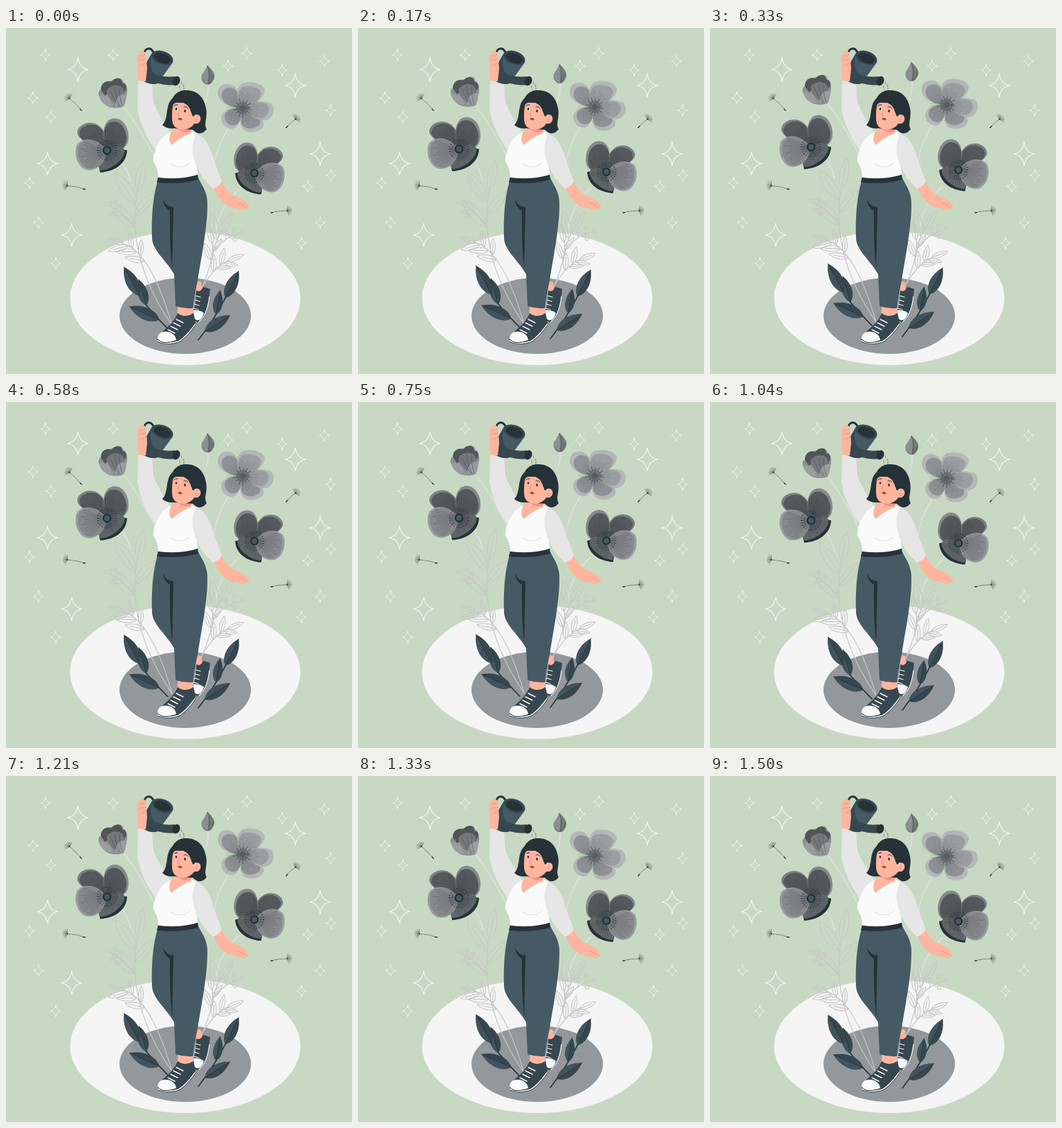
An HTML page for the animation above (1.54 s loop, 500 by 500 pixels).

```html
<!DOCTYPE html>
<html lang="en">
<head>
<meta charset="utf-8">
<title>Watering the flowers</title>
<style>
html, body { margin: 0; width: 100%; height: 100%; overflow: hidden; background: #c7d9c2; }
svg { display: block; width: 100vw; height: 100vh; }
.line { fill: none; stroke-linecap: round; stroke-linejoin: round; }
</style>
</head>
<body>
<svg id="stage" viewBox="0 0 500 500"></svg>
<script>
(() => {
const INK = '#263238', SLATE = '#37474f', DENIM = '#455a64', SKIN = '#ffb59e', BLUSH = '#e88f7c';
const PALE = '#c7c7c7', STEM = '#dedfdd', WHITE = '#fafafa', SLEEVE = '#e6e6e6';
const LOOP = 1540, LIFT = 9.6, LEAD = 60;

const fill = (color, d) => `<path fill="${color}" d="${d}"/>`;
const line = (color, width, d) => `<path class="line" stroke="${color}" stroke-width="${width}" d="${d}"/>`;
const oval = (color, x, y, rx, ry = rx, turn = 0) =>
  `<ellipse fill="${color}" cx="${x}" cy="${y}" rx="${rx}" ry="${ry}" transform="rotate(${turn} ${x} ${y})"/>`;
const place = (x, y, sx, sy, body) => `<g transform="translate(${x} ${y}) scale(${sx} ${sy})">${body}</g>`;
const repeat = (count, make) => Array.from({ length: count }, (_, i) => make(i)).join('');

const star = size => ([x, y]) => {
  const k = size * .13, w = size * .88;
  const d = `M0 ${-size}Q${k} ${-k} ${w} 0Q${k} ${k} 0 ${size}Q${-k} ${k} ${-w} 0Q${-k} ${-k} 0 ${-size}Z`;
  return place(x, y, 1, 1, line('#f7faf5', size > 12 ? 1.1 : .75, d));
};

// A thin stalk from the seed to a fan of hairs
function dandelion(x, y, seedX, seedY) {
  const back = Math.atan2(y - seedY, x - seedX), cos = Math.cos(back), sin = Math.sin(back);
  const hairs = repeat(7, i => {
    const a = back + (i - 3) * .42;
    return `M${x} ${y}l${7 * Math.cos(a)} ${7 * Math.sin(a)}`;
  });
  return line(INK, .5, `${hairs}M${x} ${y}Q${(x + seedX) / 2} ${(y + seedY) / 2 - 2} ${seedX} ${seedY}`) +
    line(INK, 1.5, `M${seedX} ${seedY}l${2.4 * cos} ${2.4 * sin}`);
}

// Leaves and berries point along +x from their base
const blade = (n, w) => `M0 0C${n * .2} ${-w} ${n * .65} ${-w} ${n} 0C${n * .65} ${w} ${n * .2} ${w} 0 0Z`;
const paleLeaf = n => line(PALE, 1.1, `${blade(n, n * .2)}M0 0H${n * .75}`);
const darkLeaf = n => fill(SLATE, blade(n, n * .25)) +
  fill('#41535d', `M0 0C${n * .2} ${-n * .25} ${n * .65} ${-n * .25} ${n} 0Z`) + line(INK, .8, `M0 0H${n}`);
const berry = n => line(PALE, 1.1, `M0 0H${n}m5 0a2.5 2.5 0 1 1 -5 0a2.5 2.5 0 1 1 5 0`);

// A curved stem with growths on alternate sides and one at its tip
function sprig([x0, y0], [x1, y1], [x2, y2], { from, count, size, spread, side = -1, grow }) {
  const stem = grow === darkLeaf ? line(INK, 1.6, `M${x0} ${y0}Q${x1} ${y1} ${x2} ${y2}`)
    : line(PALE, 1.2, `M${x0} ${y0}Q${x1} ${y1} ${x2} ${y2}`);
  return stem + repeat(count, i => {
    const t = from + (1 - from) * i / (count - 1), u = 1 - t;
    const x = u * u * x0 + 2 * u * t * x1 + t * t * x2, y = u * u * y0 + 2 * u * t * y1 + t * t * y2;
    const along = Math.atan2(u * (y1 - y0) + t * (y2 - y1), u * (x1 - x0) + t * (x2 - x1));
    const tip = i === count - 1, turn = tip ? 0 : spread * side * (i % 2 ? -1 : 1);
    const angle = (along + turn) * 180 / Math.PI;
    return `<g transform="translate(${x} ${y}) rotate(${angle})">${grow(size * (i % 2 ? .82 : 1))}</g>`;
  });
}

function rays(from, to, count, inner, outer, color = '#26323880', width = .5) {
  return line(color, width, repeat(count, i => {
    const a = (from + (to - from) * i / (count - 1)) * Math.PI / 180, r = outer * (.9 + .1 * Math.sin(i * 2.3));
    return `M${inner * Math.cos(a)} ${inner * Math.sin(a)}L${r * Math.cos(a)} ${r * Math.sin(a)}`;
  }));
}
const stamens = (r, color = INK) => rays(0, 345, 24, 0, r, color, .55) +
  repeat(24, i => oval(color, r * Math.cos(i * .262), r * Math.sin(i * .262), .8)) + oval(color, 0, 0, r * .46);

const petal = (rim, inner, scale, d) => fill(rim, d) + place(0, 0, scale, scale, fill(inner, d));

const poppy = () =>
  petal('#7b7f82', '#54595d', .93, 'M0 0C-21 -5 -44 -15 -43 -27C-40 -40 -21 -44 -11 -35C-3 -29 0 -17 0 0Z') +
  rays(212, 250, 8, 9, 38) +
  petal('#85898c', '#53585c', .9, 'M0 0C-9 -19 -6 -40 5 -45C20 -51 32 -35 31 -17C30 -3 19 3 0 0Z') +
  rays(265, 330, 11, 9, 34) +
  fill(INK, 'M-10 32C11 31 28 19 29 0L20 -2L-12 22Z') +
  fill('#5f6468', 'M0 0C12 -9 28 -7 25 4C21 17 5 28 -9 29C-16 24 -7 10 0 0Z') +
  rays(5, 95, 10, 9, 22) +
  petal('#9a9da0', '#85888c', .93, 'M0 0C-14 -19 -34 -19 -43 -9C-49 3 -44 23 -31 28C-16 32 -2 18 0 0Z') +
  rays(132, 200, 13, 9, 38) + stamens(14) + oval(DENIM, 0, 0, 4);

const openFlower = () => [
  'M0 0C-17 1 -37 -8 -36 -23C-35 -36 -21 -38 -13 -32C-4 -24 -1 -12 0 0Z',
  'M0 0C-11 -13 -11 -30 0 -36C12 -40 31 -36 32 -25C29 -10 14 -4 0 0Z',
  'M0 0C16 6 34 16 30 26C25 36 8 37 1 31C-6 22 -2 9 0 0Z',
  'M0 0C8 -10 31 -13 42 -6C48 3 44 15 32 18C19 17 8 8 0 0Z',
  'M0 0C-2 14 -5 29 -16 30C-29 29 -34 16 -29 8C-22 0 -10 -1 0 0Z',
].map((d, i) => petal('#b4b6b7', i % 2 ? '#9b9ea0' : '#8f9295', .84, d)).join('') +
  rays(0, 352, 45, 3, 25, '#42484c80', .45) + rays(10, 355, 14, 0, 14, '#5c6266', 1.1) + stamens(8, '#565c60');

const closedFlower = () =>
  fill('#8c9093', 'M170 114C153 119 140 113 135 100C131 91 137 87 143 88C141 78 150 75 155 77C160 70 169 72 169 78C176 81 176 92 174 99Z') +
  fill('#505559', 'M137 89C137 79 146 75 152 78C158 70 168 72 168 80C175 80 175 89 171 93L160 85L150 92L143 98Z') +
  fill('#74787b', 'M145 91C151 81 163 81 169 87C174 98 174 108 169 114C157 112 149 104 145 91Z') +
  fill('#9a9da0', 'M135 98C142 95 150 99 154 113C144 114 138 108 135 98ZM158 113C158 101 165 94 174 96Q174 108 169 114Z') +
  line('#4a5054', .6, 'M150 90Q155 101 163 113M157 86Q158 101 165 113M164 87Q164 102 168 112');

const bud = () =>
  fill('#74797c', 'M291 54C297 60 302 65 301 72C299 78 296 82 292 82C286 82 281 76 283 68C286 65 289 60 291 54Z') +
  fill('#8b8f92', 'M291 55C294 65 291 75 292 81C284 79 281 72 284 67Z') +
  line('#4d5357', .7, 'M291 55Q297 69 292 81M300 68Q298 76 293 81');

const plantArt = () =>
  line(STEM, 1.8, 'M169 113Q195 146 218 194M164 190Q177 206 180 222M292 82Q293 94 288 108' +
    'M322 144Q304 172 300 202M336 234Q309 258 304 291') +
  sprig([240, 430], [172, 330], [190, 236], { from: .72, count: 4, size: 53, spread: .7, grow: paleLeaf }) +
  sprig([240, 430], [210, 325], [170, 312], { from: .6, count: 6, size: 29, spread: .75, grow: paleLeaf }) +
  sprig([185, 285], [170, 268], [155, 260], { from: .5, count: 5, size: 9, spread: .9, grow: berry }) +
  sprig([277, 390], [302, 335], [298, 312], { from: .6, count: 3, size: 27, spread: .6, grow: paleLeaf }) +
  sprig([298, 335], [300, 312], [310, 296], { from: .7, count: 2, size: 40, spread: .6, grow: paleLeaf }) +
  sprig([279, 382], [300, 345], [320, 337], { from: .5, count: 5, size: 25, spread: .7, grow: paleLeaf }) +
  sprig([299, 325], [312, 305], [333, 298], { from: .6, count: 4, size: 8, spread: .9, grow: berry }) +
  sprig([234, 435], [200, 400], [193, 387], { from: .2, count: 3, size: 47, spread: .4, grow: darkLeaf }) +
  sprig([278, 451], [302, 420], [317, 390], { from: .2, count: 3, size: 43, spread: .38, side: 1, grow: darkLeaf }) +
  closedFlower() + bud() + place(342, 116, 1, 1, openFlower()) +
  place(146, 177, 1, 1, poppy()) + place(359, 210, -.96, .96, poppy());

const can = () =>
  line(INK, 3, 'M199 43C198 31 205 28 210 31L216 38') +
  fill(DENIM, 'M211 36L194 66C192 76 209 84 219 80L241 50C244 39 216 29 211 36Z') +
  fill(SLATE, 'M211 36L194 66C192 76 209 84 219 80L226 70C212 68 205 59 211 36Z') +
  oval(SLATE, 226, 43, 16, 9.5, 20) + oval(INK, 226, 43.5, 12.5, 6.8, 20) +
  fill(SLATE, 'M217 68C227 70 233 71 244 70L245 82C233 84 220 80 216 79Z') +
  oval(INK, 246, 76.5, 5.3, 7, 22) +
  line('#607580', .9, 'M253 78l1 2M256 82l1 3M251 84l0 3M257 87l0 3M253 90l0 2');

const hand = () =>
  fill(SKIN, 'M191 76L190 48C188 40 192 33 199 33C204 38 201 42 203 46L204 59L202 77Z') +
  line(BLUSH, .7, 'M194 41L201 39M193 47L202 45M195 54L202 51');

const arms = () =>
  fill(SLEEVE, 'M191 74Q197 79 211 80L213 108Q223 130 238 152L221 183C205 163 190 133 190 111Z') +
  fill(SKIN, 'M299 229L312 221Q318 238 332 243Q347 249 352 259Q350 263 343 259L349 263Q337 262 329 260Q309 256 299 229Z') +
  line(BLUSH, .7, 'M334 253Q341 254 347 259');

const shoes = () =>
  fill(SKIN, 'M275 365L282 367L284 382L274 382ZM249 399L270 399L271 416L247 416Z') +
  fill(SLATE, 'M275 379Q281 383 285 374L295 377Q293 399 289 410Q284 424 276 425Q269 422 270 414L274 397Z') +
  fill(WHITE, 'M271 408Q280 407 286 412Q282 424 275 422Q269 419 271 408Z') +
  line(WHITE, 1.2, 'M294 388Q291 414 279 424' + repeat(4, i => `M${274 - i} ${387 + 6 * i}l7 2`)) +
  fill(SLATE, 'M248 412Q258 420 271 412L274 426C267 435 259 447 249 453Q227 461 219 450C218 440 239 434 248 412Z') +
  fill(WHITE, 'M224 440C235 436 245 442 246 451Q227 458 219 449Q219 443 224 440Z') +
  line(WHITE, 1.4, 'M273 429Q260 447 249 453Q228 459 220 452' + repeat(4, i => `M${246 - 4 * i} ${421 + 5 * i}l10 5`)) +
  line(INK, .8, 'M220 454Q238 460 252 453Q264 444 274 429');

const trousers = () =>
  fill(DENIM, 'M219 221Q248 226 278 217C284 229 292 238 291 257C291 291 281 337 277 365Q272 386 270 405Q258 406 245 402L243 356C233 337 211 321 211 303C210 273 212 246 219 221Z') +
  fill(INK, 'M227 247Q230 258 242 259L240 348Q236 310 237 264Q227 258 227 247Z') +
  fill(INK, 'M220 215Q249 219 277 211L278 219Q249 227 218 223Z');

const blouse = () =>
  fill(WHITE, 'M237 150L226 158C217 171 212 184 213 193Q220 203 220 216Q251 220 277 212Q276 201 274 188L277 154L268 149Z') +
  fill(SLEEVE, 'M275 153C289 157 296 174 302 195L312 222Q307 230 299 232C285 220 276 205 271 187C268 173 270 160 275 153Z') +
  line('#e0e0e0', 1, 'M237 196Q252 207 266 195') +
  fill(SKIN, 'M238 151L250 140L269 144L267 152Q253 157 239 169Q234 163 238 151Z') +
  fill('#f0957f', 'M247 144Q259 150 268 142L267 149Q255 154 247 144Z');

const head = () =>
  fill(INK, 'M241 101C229 112 236 130 226 140Q231 146 243 145L270 147Q281 158 290 146C285 138 292 130 289 116C286 97 273 89 258 90C249 91 244 95 241 101Z') +
  fill(SKIN, 'M242 108C240 117 239 130 241 138Q244 146 254 147C264 147 270 142 272 138C281 140 284 130 279 126Q273 123 270 128C267 119 266 113 261 108Z') +
  fill(INK, 'M240 112C242 94 255 89 266 98C275 103 282 111 283 125Q275 121 271 128C266 122 267 113 258 109Q249 103 240 112Z') +
  oval(INK, 246, 117, 1.3, 1.8) + oval(INK, 258.5, 120, 1.4, 1.9) +
  line(INK, 1, 'M243 112Q246 110 248 111M257 114Q261 113 263 116') +
  line(BLUSH, .9, 'M251 119Q247 125 249 126L251 126M276 129Q273 132 275 135') +
  fill('#a8453f', 'M248 131Q252 128 255 132Q251 135 248 131Z');

const largeStars = [[104, 60], [60, 196], [95, 299], [454, 182], [418, 83]];
const smallStars = [
  [57, 39], [155, 39], [39, 101], [65, 129], [34, 224], [47, 281], [72, 340], [348, 37], [321, 55],
  [399, 61], [460, 48], [469, 119], [470, 213], [436, 229], [454, 281], [427, 311]];

document.getElementById('stage').innerHTML =
  oval('#f5f5f5', 259, 390.5, 166.5, 96.5) + oval('#92989b', 259, 416, 95, 55) +
  largeStars.map(star(17)).join('') + smallStars.map(star(8.5)).join('') +
  dandelion(92, 102, 109, 119) + dandelion(89, 228, 114, 233) +
  dandelion(418, 132, 405, 144) + dandelion(406, 264, 383, 267) +
  `<g id="plants">${plantArt()}</g>` +
  shoes() + trousers() + arms() + blouse() + can() + hand() + head();

const plants = document.getElementById('plants');
function draw() {
  const phase = (performance.now() + LEAD) / LOOP;
  const y = -LIFT * (1 - Math.cos(phase * 2 * Math.PI)) / 2;
  plants.setAttribute('transform', `translate(0 ${y.toFixed(3)})`);
  requestAnimationFrame(draw);
}
draw();
})();
</script>
</body>
</html>
```
